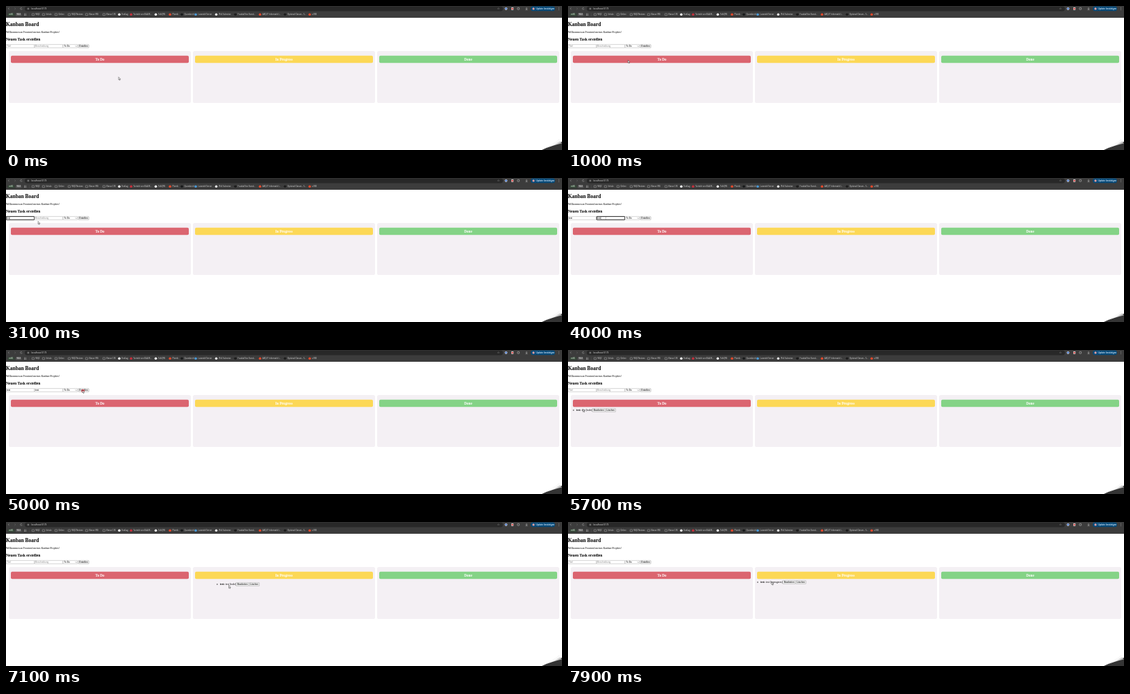
Animation, 800 px wide and 208 px high, one loop 8 s. Source, as an HTML page with a canvas:

```html
<!DOCTYPE html>
<html lang="de">
<head>
<meta charset="utf-8">
<title>Kanban Board</title>
<style>
html, body { margin: 0; width: 100%; height: 100%; overflow: hidden; background: #fff; }
canvas { display: block; width: 800px; height: 208px; }
</style>
</head>
<body>
<canvas id="stage" width="800" height="208"></canvas>
<script>
const ctx = document.getElementById('stage').getContext('2d');
const LOOP = 8000, STEP = 100;
const ZOOM = 1 / 4.3; // a 3440 px wide screen shown at 800 px
const SERIF = '"Liberation Serif", "Times New Roman", serif';
const SANS = '"Liberation Sans", Arial, sans-serif';
const UI = '"Open Sans", sans-serif';

// Text sizes are in screen pixels, positions in stage pixels.
function text(str, x, y, size, color = '#000', family = SERIF, weight = 400, align = 'left') {
  ctx.save();
  ctx.translate(x, y);
  ctx.scale(ZOOM, ZOOM);
  ctx.font = `${weight} ${size}px ${family}`;
  ctx.fillStyle = color;
  ctx.textAlign = align;
  ctx.fillText(str, 0, 0);
  const width = ctx.measureText(str).width * ZOOM;
  ctx.restore();
  return width;
}

function box(x, y, w, h, r, fill, stroke, line = 0.25) {
  ctx.beginPath();
  ctx.roundRect(x, y, w, h, r);
  if (fill) { ctx.fillStyle = fill; ctx.fill(); }
  if (stroke) { ctx.strokeStyle = stroke; ctx.lineWidth = line; ctx.stroke(); }
}

function dot(x, y, r, color) {
  ctx.beginPath();
  ctx.arc(x, y, r, 0, Math.PI * 2);
  ctx.fillStyle = color;
  ctx.fill();
}

function poly(points, fill, stroke, line = 0.4) {
  ctx.beginPath();
  points.forEach(([x, y]) => ctx.lineTo(x, y));
  if (fill) { ctx.closePath(); ctx.fillStyle = fill; ctx.fill(); }
  if (stroke) { ctx.strokeStyle = stroke; ctx.lineWidth = line; ctx.stroke(); }
}

const BOOKMARKS = [
  [39, 'WQZ', 'folder'], [54, 'Schule', 'folder'], [72, 'Online', 'folder'],
  [91, 'WQZ Notizen', 'folder'], [116, 'Klasse VBS', 'folder'], [141, 'Klasse C/B', 'folder'],
  [163, 'KodLag', '#f4f4f4'], [180, 'Vorteile von BLAUK…', '#c62f3c'],
  [215.5, 'TalkQRV', '#f4f4f4'], [236, 'Plomik', '#e4492c'], [253, 'Quandoriel', '#17191a'],
  [273, 'Lavendel Server', '#4b9bd8'], [302.5, 'IPv4 Subnetze', '#e8e8e8'],
  [330, 'Fussball live Stand…', '#1c1c1c'], [365.5, 'ABQ-IT Informatik (…', '#e4492c'],
  [401.5, 'Optional Classes - S…', '#1c1c1c'], [437, 'uVXB', '#e4492c']
];

function drawBrowser() {
  ctx.fillStyle = '#3c3c3c';
  ctx.fillRect(0, 0, 800, 17);
  box(27, 0.6, 688, 6.8, 3.4, '#282828');
  poly([[4.6, 2.6], [3.3, 3.8], [4.6, 5]], null, '#d0d0d0');
  poly([[12.4, 2.6], [13.7, 3.8], [12.4, 5]], null, '#858585');
  ctx.beginPath();
  ctx.arc(22, 3.8, 1.3, 0.3, 5.5);
  ctx.strokeStyle = '#d0d0d0';
  ctx.stroke();
  dot(32, 3.9, 1.9, '#464646');
  dot(32, 3.9, 0.7, '#c8c8c8');
  text('localhost:5173', 36.5, 5, 14, '#e4e4e4', UI);

  text('☆', 706.8, 5.3, 17, '#d8d8d8', '"DejaVu Sans", sans-serif');
  dot(719.5, 3.8, 1.9, '#e8edf8');
  dot(719.5, 3.8, 1.2, '#366bc8');
  box(727, 2, 3.2, 3.8, 0.6, '#e8e8e8');
  dot(728.6, 3.9, 1.2, '#cf3535');
  box(735.8, 2.4, 2.8, 2.8, 0.5, null, '#cfcfcf', 0.5);
  poly([[749, 2], [749, 4.7]], null, '#d8d8d8', 0.5);
  poly([[747.8, 3.5], [749, 4.8], [750.2, 3.5]], null, '#d8d8d8');
  poly([[747.5, 5.6], [750.5, 5.6]], null, '#d8d8d8');
  box(755, 0.5, 35, 6.8, 3.4, '#084a78');
  dot(759, 3.9, 1.6, '#e8a0a0');
  text('Update bestätigen', 762.4, 5, 13, '#d9edff', UI, 600);
  [2.2, 3.8, 5.4].forEach(y => dot(795.5, y, 0.4, '#d8d8d8'));

  box(2.5, 10.4, 10, 4, 1, '#344537');
  text('mVG', 4.2, 13.4, 11, '#cfe6d1', UI, 600);
  box(14, 10.4, 8.5, 4, 1, '#505050');
  text('WGS', 15.4, 13.4, 11, '#e6e6e6', UI, 600);
  for (let i = 0; i < 9; i++) {
    ctx.fillStyle = '#c8c8c8';
    ctx.fillRect(26.2 + i % 3 * 1.2, 10.7 + Math.floor(i / 3) * 1.2, 0.7, 0.7);
  }
  poly([[33.5, 10], [33.5, 15]], null, '#5d5d5d', 0.3);
  for (const [x, label, icon] of BOOKMARKS) {
    if (icon === 'folder') box(x - 1.7, 10.9, 3.4, 2.8, 0.4, null, '#c8c8c8', 0.4);
    else dot(x, 12.3, 1.8, icon);
    text(label, x + 3.5, 13.4, 11.5, '#dedede', UI);
  }
}

function input(x, value, hint, focused, caret) {
  box(x + 0.25, 55.6, 40.5, 4.8, 0.4, '#fff', focused ? '#111' : '#858585', focused ? 0.9 : 0.35);
  const w = text(value || hint, x + 1.2, 59.1, 13.33, value ? '#000' : '#858585', SANS);
  if (focused && caret) {
    ctx.fillStyle = '#000';
    ctx.fillRect(x + 1.3 + (value ? w : 0), 56.5, 0.3, 3.2);
  }
}

function button(label, x, y, w) {
  box(x, y, w, 4.8, 0.6, '#efefef', '#767676', 0.3);
  text(label, x + w / 2, y + 3.55, 13.33, '#000', SANS, 400, 'center');
}

function drawColumn(x, title, color) {
  box(x, 65, 262, 75, 2.6, '#f4f0f4');
  box(x + 3, 71.8, 256, 10.4, 1.9, color);
  text(title, x + 131, 78.7, 22, '#fff', SERIF, 700, 'center');
}

function drawTask(x, y, status) {
  dot(x + 0.9, y, 0.65, '#000');
  let pen = x + 5;
  pen += text('test:', pen, y + 1.2, 16, '#000', SERIF, 700);
  pen += text(` test [${status}]`, pen, y + 1.2, 16);
  button('Bearbeiten', pen + 0.1, y - 2.4, 18.4);
  button('Löschen', pen + 18.8, y - 2.4, 14.8);
}

function drawPageCurl() {
  poly([[771, 208], [785, 201], [800, 196], [800, 208]], '#343434');
  const sheen = ctx.createLinearGradient(783, 198, 789, 207);
  sheen.addColorStop(0, '#d9d9d9');
  sheen.addColorStop(0.4, '#ffffff');
  sheen.addColorStop(1, '#777777');
  ctx.beginPath();
  ctx.moveTo(770, 208);
  ctx.quadraticCurveTo(786, 201, 796, 192.3);
  ctx.quadraticCurveTo(796.5, 196, 800, 198.5);
  ctx.quadraticCurveTo(787, 201, 770, 208);
  ctx.fillStyle = sheen;
  ctx.fill();
}

// Pointer path: time, x, y
const PATH = [
  [0, 162, 102.6], [300, 155, 103], [900, 90, 80], [1400, 54, 62], [1900, 36, 54.5],
  [2100, 35, 54], [2400, 36, 55], [3000, 46, 62.5], [3300, 46.5, 62.5], [3500, 54.5, 58],
  [4400, 54.5, 58], [4900, 110, 58], [5100, 110, 58], [5600, 21, 84.5],
  [5800, 22, 86], [6100, 24.5, 88.5], [7100, 320.5, 91.5], [7600, 293, 86.5], [8000, 293, 86.5]
];

function pointerAt(t) {
  const i = PATH.findIndex(p => p[0] > t);
  const [t0, x0, y0] = PATH[i - 1], [t1, x1, y1] = PATH[i];
  const u = (t - t0) / (t1 - t0), e = u * u * (3 - 2 * u);
  return [x0 + (x1 - x0) * e, y0 + (y1 - y0) * e];
}

function drawPointer(x, y, clicked) {
  if (clicked) dot(x + 0.7, y + 1, 2.3, 'rgba(222,40,55,.75)');
  const overField = x < 82 && y > 55.5 && y < 60.5;
  if (overField && !clicked) {
    poly([[x, y - 1.8], [x, y + 1.8]], null, '#333', 0.3);
    return;
  }
  const arrow = [[0, 0], [0, 4], [0.95, 3.2], [1.6, 4.7], [2.2, 4.4], [1.6, 3], [2.8, 2.9], [0, 0]];
  poly(arrow.map(([dx, dy]) => [x + dx, y + dy]), '#fff', '#111', 0.4);
}

const typed = (t, times) => 'test'.slice(0, times.filter(at => t >= at).length);
const CLICKS = [2100, 3500, 5000, 6000];

function draw(t) {
  ctx.fillStyle = '#fff';
  ctx.fillRect(0, 0, 800, 208);
  drawBrowser();
  text('Kanban Board', 0, 29, 32, '#000', SERIF, 700);
  text('Willkommen an Frontend meines Kanban-Projekts!', 0, 39.1, 16);
  text('Neuen Task erstellen', 0, 49.5, 24, '#000', SERIF, 700);

  const sent = t >= 5100;
  const caret = t % 1000 < 600;
  input(0, sent ? '' : typed(t, [2800, 2900, 3000, 3200]), 'Titel', t >= 2200 && t < 3500, caret);
  input(41, sent ? '' : typed(t, [3600, 3700, 3800, 4000]), 'Beschreibung', t >= 3500 && t < 5000, caret);
  box(82.3, 55.6, 20.8, 4.8, 0.3, '#fff', '#767676', 0.3);
  text('To Do', 83.6, 59.1, 13.33, '#000', SANS);
  poly([[100, 57.5], [101, 58.5], [102, 57.5]], null, '#222', 0.45);
  button('Erstellen', 103.9, 55.6, 15.4);

  drawColumn(4, 'To Do', '#db6570');
  drawColumn(269, 'In Progress', '#fcd856');
  drawColumn(534, 'Done', '#84d386');

  const [x, y] = pointerAt(t);
  if (t >= 7600) drawTask(272, 87, 'inprogress');
  else if (t >= 6100) drawTask(x - 17.5, y - 1.5, 'todo');
  else if (sent) drawTask(7, 87, 'todo');

  drawPageCurl();
  drawPointer(x, y, CLICKS.some(at => t >= at && t < at + 200));
}

const start = performance.now();
function tick() {
  const t = (performance.now() - start) % LOOP;
  draw(Math.floor(t / STEP) * STEP);
  requestAnimationFrame(tick);
}
tick();
</script>
</body>
</html>
```
